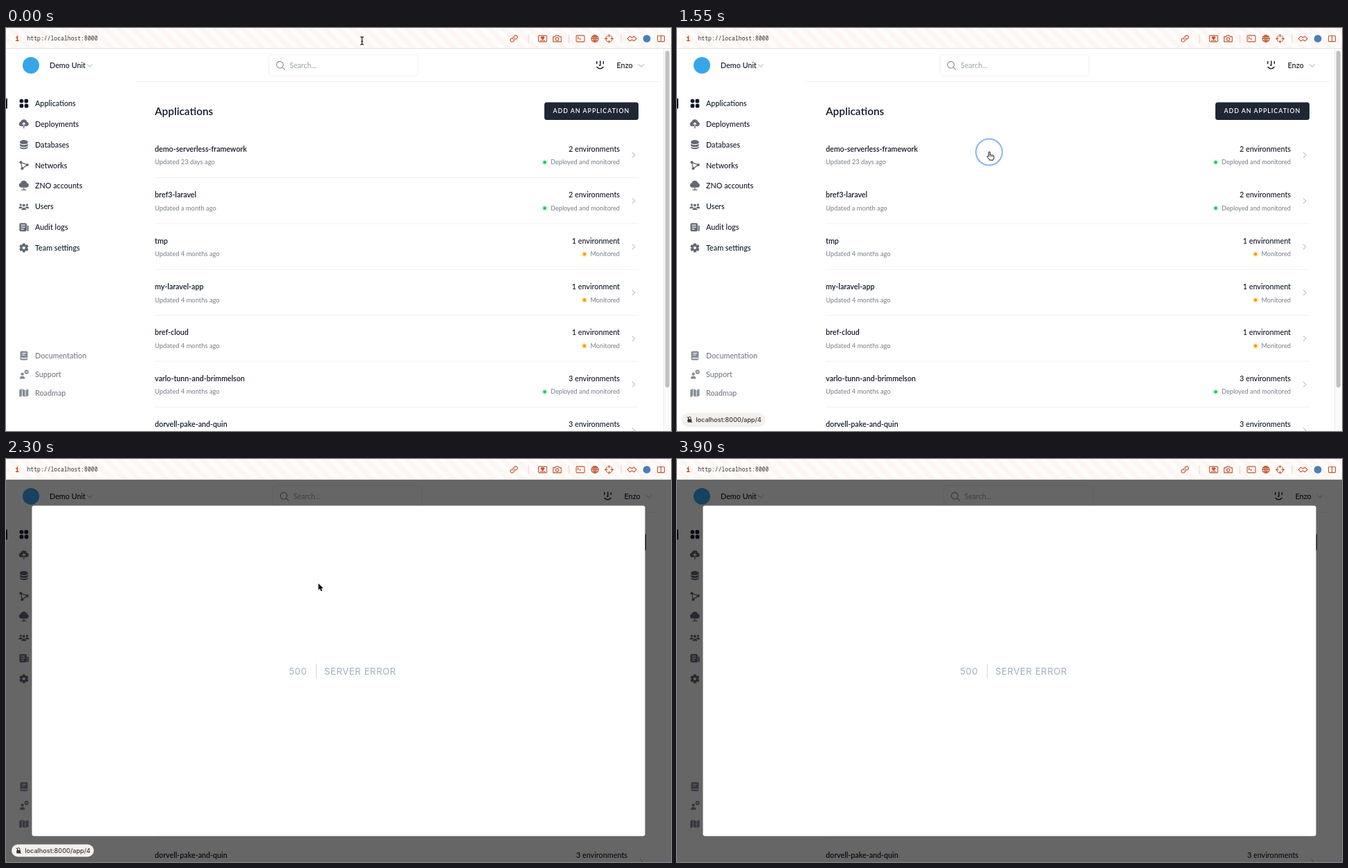
An HTML page that plays this animation: 961x583 px, repeating every 4100 ms.

```html
<!DOCTYPE html>
<html lang="en">
<head>
<meta charset="utf-8">
<title>Applications</title>
<style>
html, body { margin: 0; width: 100%; height: 100%; overflow: hidden; background: #fff; }
svg { display: block; width: 961px; height: 583px; }
text { font: 500 10.8px Lato, sans-serif; fill: #111827; white-space: pre; }
.title { font-weight: 600; font-size: 10.7px; }
.heading { font-weight: 600; font-size: 15.4px; }
.small { font-weight: 400; font-size: 9.4px; fill: #777c87; }
.status { font-weight: 400; font-size: 9.2px; fill: #777c87; }
.muted { fill: #747a86; }
.hint { font-weight: 400; fill: #9aa0aa; font-size: 10.6px; }
.button { font-weight: 600; font-size: 8.8px; letter-spacing: 1px; fill: #fff; }
.url { font: 500 8.1px "Noto Sans Mono", monospace; fill: #33302e; }
.info { font: 700 10px "Noto Sans Mono", monospace; fill: #c2410c; }
.link { font: 500 9.1px Inter, sans-serif; fill: #3b3836; }
.error { font: 400 13px Inter, sans-serif; letter-spacing: .65px; fill: #a0aec0; }
.end { text-anchor: end; }
.line { fill: none; stroke: #eff0f2; }
.chevron { fill: none; stroke: #9ca3af; stroke-linecap: round; stroke-linejoin: round; }
.tool { fill: none; stroke: #bf5530; stroke-width: 1.1; stroke-linejoin: round; stroke-linecap: round; }
.cut { fill: none; stroke: #fff; stroke-width: 1.2; }
</style>
</head>
<body>
<svg id="stage" viewBox="0 0 961 583"></svg>
<script>
const LOOP = 4100, ROW = 66.4;
const stage = document.getElementById('stage');

const text = (x, y, s, cls = '') => `<text x="${x}" y="${y}" class="${cls}">${s}</text>`;
const at = (x, y, body, attrs = '') => `<g transform="translate(${x} ${y})" ${attrs}>${body}</g>`;
const path = (d, attrs = '') => `<path d="${d}" ${attrs}/>`;
const circle = (x, y, r, attrs = '') => `<circle cx="${x}" cy="${y}" r="${r}" ${attrs}/>`;
const rect = (x, y, w, h, r = 0, attrs = '') =>
  `<rect x="${x}" y="${y}" width="${w}" height="${h}" rx="${r}" ${attrs}/>`;
const cut = d => path(d, 'class="cut"');
const down = (x, y) => path(`M${x - 3.5} ${y - 1.8}l3.5 3.6l3.5 -3.6`, 'class="chevron"');

const cloud = 'M-4 3.2a3.2 3.2 0 0 1-.6-6.3a4.7 4.7 0 0 1 9.1 0a3.2 3.2 0 0 1-.5 6.3z';
const person = (x, y, s) => at(x, y, circle(0, -2.6, 2.2) + path('M-3.8 4.2a3.8 3.8 0 0 1 7.6 0z'), '')
  .replace(')"', `) scale(${s})"`);

const icons = {
  apps: circle(-3.4, -3.4, 2.9) + rect(.7, -6.2, 5.6, 5.6, 1.7) + rect(-6.2, .8, 5.6, 5.6, 1.7) + rect(.9, .8, 5.6, 5.6, 1.7),
  deploy: path(cloud) + cut('M0 4v-5.5M-2.2 .6l2.2 -2.3l2.2 2.3') + rect(-.7, 2.5, 1.4, 4, .7),
  database: path('M-5.8 -4a5.8 2.6 0 0 1 11.6 0v8a5.8 2.6 0 0 1 -11.6 0z') + cut('M-6 -2.6a6 2.6 0 0 0 12 0M-6 1.3a6 2.6 0 0 0 12 0'),
  network: path('M-4.3 -4.3L5 -.7L-2.4 4.7z', 'fill="none" stroke="#636874" stroke-width="1.3"') +
    circle(-4.4, -4.3, 2) + circle(5, -.7, 2) + circle(-2.4, 4.6, 2),
  cloud: at(0, -1, path(cloud)) + rect(-.6, 2, 1.2, 4, .4) + rect(-3.6, 5, 7.2, 1.3, .6),
  users: person(-4.6, -.4, .75) + person(4.6, -.4, .75) +
    `<g stroke="#fff" stroke-width=".7">${person(0, .9, 1.05)}</g>`,
  logs: rect(-6.4, -6, 10.5, 12, 1.8) + path('M4.8 -2.5h1a1 1 0 0 1 1 1v6a1.4 1.4 0 0 1-2 1z') +
    cut('M-4.2 -3h6M-4.2 0h6M-4.2 3h4'),
  settings: [0, 60, 120].map(a => rect(-2, -6.6, 4, 13.2, 1, `transform="rotate(${a})"`)).join('') +
    circle(0, 0, 5) + circle(0, 0, 2.1, 'fill="#fff"'),
  docs: rect(-5.3, -6.5, 10.8, 13, 1.8) + cut('M-2.5 -3.5h5.5M-2.5 -1h4M-4 3.7h9'),
  support: person(-2.2, 2.3, 1) + circle(3.9, -3.4, 3.1) + cut('M2.3 -3.4h3.2'),
  roadmap: path('M-6.5 -4.2l3.6 -1.8v10.6l-3.6 1.6zM-2 -5.8l3.8 1.8v10l-3.8 -1.6zM2.8 -4l3.8 -1.5v9.7l-3.8 1.6z')
};

const menu = [
  ['apps', 'Applications'], ['deploy', 'Deployments'], ['database', 'Databases'], ['network', 'Networks'],
  ['cloud', 'ZNO accounts'], ['users', 'Users'], ['logs', 'Audit logs'], ['settings', 'Team settings']
];
const footer = [['docs', 'Documentation'], ['support', 'Support'], ['roadmap', 'Roadmap']];
const apps = [
  ['demo-serverless-framework', '23 days', 2], ['bref3-laravel', 'a month', 2], ['tmp', '4 months', 1],
  ['my-laravel-app', '4 months', 1], ['bref-cloud', '4 months', 1],
  ['varlo-tunn-and-brimmelson', '4 months', 3], ['dorvell-pake-and-quin', '4 months', 3]
];

function toolbar() {
  const tools = [
    [734, path('M-1 1.2a2.4 2.4 0 0 1 0 -3.2l2-2a2.4 2.4 0 0 1 3.4 3.4l-1.4 1.4M1 -1.2a2.4 2.4 0 0 1 0 3.2l-2 2a2.4 2.4 0 0 1 -3.4 -3.4l1.4 -1.4')],
    [775.5, rect(-6, -4.5, 12, 9, 1.2) + path('M0 1.2l-2.2 -2.2a1.2 1.2 0 0 1 2.2 -1a1.2 1.2 0 0 1 2.2 1zM-3.5 2.6h7', 'fill="#bf5530"')],
    [796.5, path('M-5.8 -2.8h2.6l1.2 -1.7h4l1.2 1.7h2.6v7.3h-11.6z') + circle(0, .7, 2.2)],
    [830, rect(-6, -4.5, 12, 9, 1.2) + path('M-4 -2.3l1.5 1.3l-1.5 1.3M-1.5 .5h2')],
    [851, circle(0, 0, 5) + path('M-5 0h10M-4 -2.8h8M-4 2.8h8M0 -5v10M-1 -5q-3 5 1 10M1 -5q3 5 -1 10')],
    [871.5, circle(0, 0, 4.6) + path('M0 -6v3.4M0 6v-3.4M-6 0h3.4M6 0h-3.4')],
    [904.5, path('M-6.5 0l3.6 -3.5l1.6 1.5h2.6l1.6 -1.5l3.6 3.5l-3.6 3.5l-1.6 -1.5h-2.6l-1.6 1.5z')],
    [946.5, rect(-5, -4.2, 10, 8.4, 1) + path('M0 -4.2v8.4')]
  ];
  return rect(0, 0, 961, 30, 0, 'fill="url(#stripes)"') +
    path('M0 29.5H961', 'stroke="#e8e0dc"') +
    text(13.2, 19.2, 'i', 'info') + text(30.5, 18.4, 'http://localhost:8000', 'url') +
    path('M755 9v13M813.5 9v13M889 9v13', 'stroke="#e6d9d2"') +
    tools.map(([x, body]) => at(x, 15.4, body, 'class="tool"')).join('') +
    circle(926, 15.4, 5.4, 'fill="#4a7fb5"');
}

function sidebar() {
  const entry = (x, y, icon, label, color, cls) =>
    at(x, y, icons[icon], `fill="${color}"`) + text(42, y + 4, label, cls);
  return circle(36, 54, 12, 'fill="#36a6e9"') + text(63, 57.9, 'Demo Unit') + down(121, 54.5) +
    rect(0, 102, 1.8, 14.5, 0, 'fill="#000"') +
    menu.map(([icon, label], i) => entry(25.8, 109 + i * 29.86, icon, label, i ? '#636874' : '#111827')).join('') +
    footer.map(([icon, label], i) => entry(25.8, 474 + i * 26.9, icon, label, '#858b97', 'muted')).join('');
}

function appLeft([name, age], i) {
  const y = i * ROW;
  return text(215, 178.8 + y, name, 'title') + text(215, 197.3 + y, `Updated ${age} ago`, 'small') +
    path(`M215 ${216.5 + y}H914`, `class="line" ${i ? '' : 'id="firstLine"'}`);
}

function appRight([, , count], i) {
  const y = i * ROW, deployed = count > 1;
  const x = deployed ? 778.5 : 836;
  return text(887, 178.8 + y, `${count} environment${deployed ? 's' : ''}`, 'end') +
    circle(x, 194.3 + y, 4.6, `fill="${deployed ? '#dcfce7' : '#fef0cd'}"`) +
    circle(x, 194.3 + y, 2.4, `fill="${deployed ? '#22c55e' : '#f59e0b'}"`) +
    text(887, 197.3 + y, deployed ? 'Deployed and monitored' : 'Monitored', 'status end') +
    path(`M905.3 ${180.2 + y}l3.5 3.5l-3.5 3.5`, 'class="chevron"');
}

function page() {
  const search = rect(380, 38.5, 215.5, 31, 5, 'class="line"') +
    circle(395.8, 53.2, 4.8, 'fill="none" stroke="#858b97" stroke-width="1.1"') +
    path('M399.4 56.8l3.4 3.4', 'stroke="#858b97" stroke-width="1.1" stroke-linecap="round"') +
    text(410, 57.9, 'Search...', 'hint');
  const face = path('M853.7 48.5v3M863.3 48.5v3M858.8 48v6h-1.4M854 56.6q4.5 4.6 9 0',
    'fill="none" stroke="#111827" stroke-width="1.4" stroke-linecap="round"');
  const right = face + text(882.5, 57.9, 'Enzo') + down(918, 54.5) +
    rect(778, 107.5, 136, 25.5, 3.5, 'fill="#1f2735"') +
    text(790.5, 123.4, 'ADD AN APPLICATION', 'button') + apps.map(appRight).join('');
  return path('M187 77.5H944', 'class="line"') + sidebar() + text(215, 126, 'Applications', 'heading') +
    apps.map(appLeft).join('') + `<g id="search">${search}</g><g id="right">${right}</g>` +
    `<g id="scrollbar">${rect(950, 30, 11, 553, 0, 'fill="#fafafa"')}${path('M950.5 30V583', 'stroke="#ececec"')}${rect(952.7, 33, 6, 487, 3, 'fill="#c1c1c1"')}</g>`;
}

const modal = rect(0, 30, 961, 553, 0, 'fill="#000" opacity=".6"') +
  rect(37.5, 67.5, 886, 478, 3, 'fill="#fff"') +
  text(409, 311.6, '500', 'error') + path('M448.3 296v21', 'stroke="#cbd5e0"') + text(460, 311.6, 'SERVER ERROR', 'error');

const pill = rect(7, 557, 121, 20, 10, 'fill="#000" opacity=".07"') +
  rect(8, 557.5, 119, 18, 9, 'fill="#f3f0ee"') +
  rect(15.2, 566, 6, 4.6, 1, 'fill="#3b3836"') +
  path('M16.5 566v-1.8a1.7 1.7 0 0 1 3.4 0v1.8M14.6 562.5l7.4 8.4', 'fill="none" stroke="#3b3836"') +
  text(27.3, 569.8, 'localhost:8000/app/4', 'link');

// Every pointer has its hot spot at 0,0.
const pointers = {
  beam: path('M-2.4 -5.6q2.4 0 2.4 1.6v8q0 1.6 -2.4 1.6M2.4 -5.6q-2.4 0 -2.4 1.6M2.4 5.6q-2.4 0 -2.4 -1.6M-1.3 .9h2.6',
    'fill="none" stroke="#111" stroke-width="1.1"'),
  arrow: path('M0 0v9.6l2.2 -2l1.6 3.7l1.7 -.7l-1.6 -3.6h3z', 'stroke="#fff" stroke-width="1.4" paint-order="stroke"'),
  hand: path('M-1.2 5.6V0a1 1 0 0 1 2 0v3.6q1.4 -.9 2 .3q1.4 -.7 2 .4q1.7 -.4 1.7 1.2v2.2q0 1.3 -1 2.4v1H-.1v-.9L-3.2 6.3q-.3 -1.6 2 -.7z',
    'fill="#fff" stroke="#111" stroke-linejoin="round"') + path('M1 4v2.2M2.9 4.4v2M4.8 4.8v1.7', 'stroke="#111" stroke-width=".7"')
};

stage.innerHTML = `<defs><pattern id="stripes" width="14" height="14" patternUnits="userSpaceOnUse" patternTransform="rotate(-45)">
  ${rect(0, 0, 14, 14, 0, 'fill="#fffdfc"')}${rect(0, 0, 7, 14, 0, 'fill="#fdf6f2"')}</pattern></defs>` +
  page() + toolbar() + `<g id="modal">${modal}</g><g id="pill">${pill}</g>` +
  circle(451, 179.5, 0, 'id="ring" fill="none" stroke="#8db2f5" stroke-width="2"') +
  `<g id="cursor">${Object.entries(pointers).map(([k, body]) => `<g id="${k}">${body}</g>`).join('')}</g>`;

const el = id => document.getElementById(id);
const show = (id, opacity) => el(id).setAttribute('opacity', +opacity);
const move = (id, x, y) => el(id).setAttribute('transform', `translate(${x} ${y})`);
const progress = (t, from, to) => Math.min(1, Math.max(0, (t - from) / (to - from)));
const smooth = p => p * p * (3 - 2 * p);

function draw(t) {
  const failed = t >= 1600;
  const p = smooth(progress(t, 0, 550));
  const x = 514.5 - 63 * p, y = 18.5 + 161.5 * p;
  const pointer = failed ? 'arrow' : y < 70 ? 'beam' : y < 150 ? 'arrow' : 'hand';

  move('cursor', x, y);
  for (const name in pointers) show(name, name === pointer);
  show('cursor', 1 - progress(t, 2550, 2850));
  show('firstLine', y < 150);

  show('pill', progress(t, 650, 850) * (1 - progress(t, 2550, 2800)));
  el('ring').setAttribute('r', 22.8 * (1 - (1 - progress(t, 1400, 1900)) ** 5));
  show('ring', t >= 1400 ? 1 - progress(t, 1650, 1900) : 0);

  // Opening the modal removes the scrollbar, so the page grows by 11px.
  show('modal', failed);
  show('scrollbar', !failed);
  move('search', failed ? 5.5 : 0, 0);
  move('right', failed ? 11 : 0, 0);
}

function tick() {
  draw(performance.now() % LOOP);
  requestAnimationFrame(tick);
}
tick();
</script>
</body>
</html>
```
